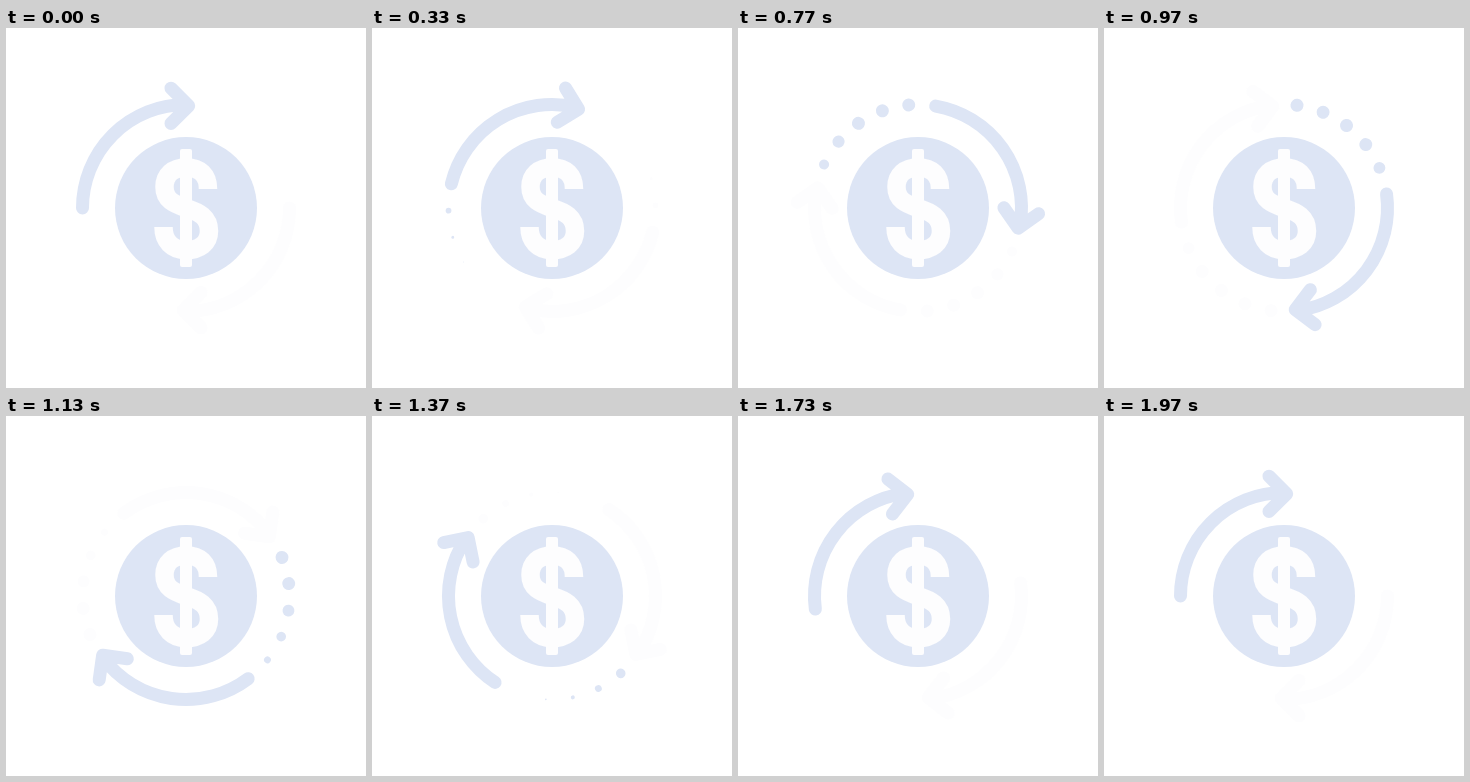
These frames come from a looping animation (360 by 360 pixels, 3.01 s). An HTML page:

```html
<!DOCTYPE html>
<html lang="en">
<head>
<meta charset="utf-8">
<title>Dollar with circling arrows</title>
<style>
  html, body { margin: 0; height: 100%; overflow: hidden; background: #fff; }
  svg { display: block; width: 100%; height: 100%; }
</style>
</head>
<body>
<svg viewBox="0 0 360 360">
  <defs>
    <g id="arrow">
      <path d="M76.5 180A103.5 103.5 0 0 1 180 76.5M165 60.2L182.7 77.8L165 95.4"
            fill="none" stroke="currentColor" stroke-width="13"
            stroke-linecap="round" stroke-linejoin="round"/>
      <g id="dots" fill="currentColor"></g>
    </g>
  </defs>
  <g id="spinner">
    <use href="#arrow" color="#fdfdfe" transform="rotate(180 180 180)"/>
    <use href="#arrow" color="#dde5f5"/>
  </g>
  <circle cx="180" cy="180" r="71" fill="#dde5f5"/>
  <path d="M202 161C202 147 194 139.5 180 139.5C167 139.5 158.5 147 158.5 159C158.5 172 168 176 180 180C193 184 203 189 203 203C203 215 194 222 180 222C166 222 157.5 213 157.5 199"
        fill="none" stroke="#fdfdfe" stroke-width="18.5"/>
  <rect x="174" y="121" width="12" height="118" rx="2" fill="#fdfdfe"/>
</svg>
<script>
const LOOP = 3010, LAST_STEP = 49;
const DOT_COUNT = 5, DOT_SPACING = 15, DOT_RADIUS = 6.5, DOT_DELAY = 2;
const spinner = document.getElementById('spinner');
const dotGroup = document.getElementById('dots');

const dots = Array.from({ length: DOT_COUNT }, (_, i) => {
  const dot = document.createElementNS('http://www.w3.org/2000/svg', 'circle');
  dot.setAttribute('cx', 76.5);
  dot.setAttribute('cy', 180);
  dot.setAttribute('transform', `rotate(${-DOT_SPACING * (i + 1)} 180 180)`);
  return dotGroup.appendChild(dot);
});

function smooth(from, to, x) {
  const s = Math.min(1, Math.max(0, (x - from) / (to - from)));
  return s * s * (3 - 2 * s);
}

// cubic-bezier(.53, 0, .47, 1), solved by bisection
function ease(x) {
  if (x <= 0 || x >= 1) return x <= 0 ? 0 : 1;
  let low = 0, high = 1;
  for (let i = 0; i < 30; i++) {
    const s = (low + high) / 2, r = 1 - s;
    if (1.59 * s * r * r + 1.41 * s * s * r + s * s * s < x) low = s;
    else high = s;
  }
  return low * low * (3 - 2 * low);
}

// Motion at 25 steps per second, shown on a 30 Hz clock with 10 ms ticks
function stepAt(ms) {
  const tick = Math.floor((Math.floor(ms / 10) + 0.5) * 0.3);
  return Math.min(LAST_STEP, Math.ceil(tick * 25 / 30 - 0.5));
}

function draw() {
  const step = stepAt(performance.now() % LOOP);
  spinner.setAttribute('transform', `rotate(${360 * ease(step / LAST_STEP)} 180 180)`);
  dots.forEach((dot, i) => {
    const local = step - DOT_DELAY * i;
    dot.setAttribute('r', DOT_RADIUS * (smooth(2, 15, local) - smooth(21.5, 35, local)));
  });
  requestAnimationFrame(draw);
}
draw();
</script>
</body>
</html>
```
